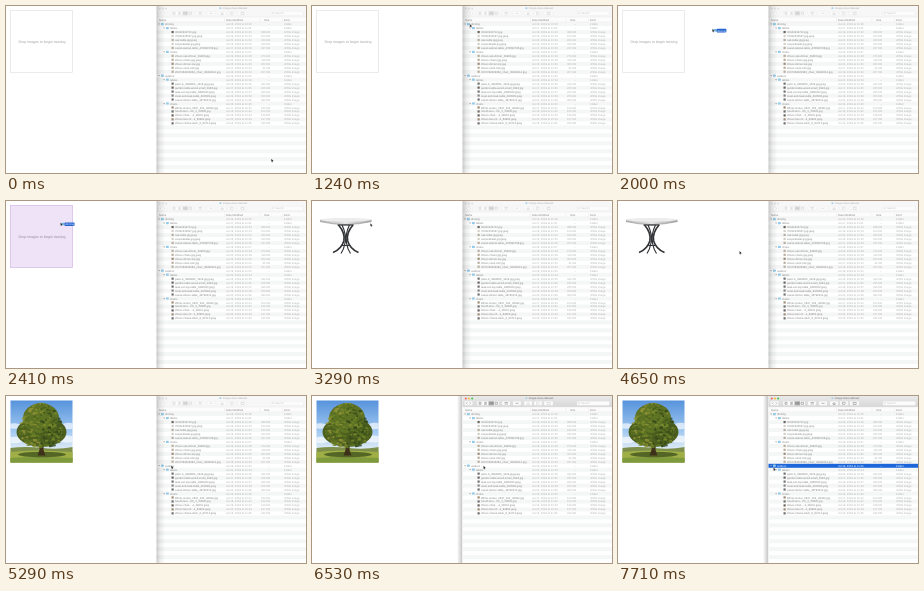
Recreate the animation shown at these times as an HTML page. Size 300 by 167 pixels, loop 8 s.

```html
<!DOCTYPE html>
<html lang="en">
<head>
<meta charset="utf-8">
<title>Drop images to train</title>
<style>
html, body { margin: 0; width: 100%; height: 100%; overflow: hidden; background: #fff; }
svg { display: block; width: 100vw; height: 100vh; }
text { font-family: "Liberation Sans", Arial, sans-serif; font-size: 2.75px; fill: #858585; text-rendering: geometricPrecision; }
</style>
</head>
<body>
<svg id="stage" viewBox="0 0 300 167" preserveAspectRatio="none">
  <defs>
    <linearGradient id="sky" x2="0" y2="1">
      <stop offset="0" stop-color="#5592dc"/><stop offset=".5" stop-color="#a3c9f0"/><stop offset=".82" stop-color="#e6eff6"/>
    </linearGradient>
    <linearGradient id="shade"><stop offset="0" stop-color="#000" stop-opacity="0"/><stop offset="1" stop-color="#000" stop-opacity=".24"/></linearGradient>
    <linearGradient id="cover"><stop offset="0" stop-color="#000" stop-opacity=".2"/><stop offset=".4" stop-color="#000" stop-opacity=".07"/><stop offset="1" stop-color="#000" stop-opacity="0"/></linearGradient>
    <linearGradient id="bar" x2="0" y2="1"><stop offset="0" stop-color="#e9e9e9"/><stop offset="1" stop-color="#d8d8d8"/></linearGradient>
    <linearGradient id="marble"><stop offset="0" stop-color="#b4b4b4"/><stop offset=".5" stop-color="#e6e6e6"/><stop offset="1" stop-color="#a4a4a4"/></linearGradient>
    <clipPath id="frame"><rect x="4.5" y="4.5" width="62" height="62"/></clipPath>
  </defs>
</svg>
<script>
const LOOP = 8000, ROW = 3.97, TOP = 16.2;
const stage = document.getElementById('stage');

function add(parent, tag, attrs = {}, text) {
  const node = document.createElementNS('http://www.w3.org/2000/svg', tag);
  for (const key in attrs) node.setAttribute(key, attrs[key]);
  if (text) node.textContent = text;
  parent.appendChild(node);
  return node;
}
const group = (parent = stage, attrs) => add(parent, 'g', attrs);
const box = (p, x, y, width, height, fill, more) => add(p, 'rect', { x, y, width, height, fill, ...more });
const path = (p, d, fill, more) => add(p, 'path', { d, fill, ...more });
const line = (p, d, stroke, width = 1) => path(p, d, 'none', { stroke, 'stroke-width': width, 'stroke-linejoin': 'round' });
const label = (p, x, y, str, more) => add(p, 'text', { x, y, ...more }, str);
const oval = (p, cx, cy, rx, ry, fill, more) => add(p, 'ellipse', { cx, cy, rx, ry, fill, ...more });

function seeded(seed) {
  return () => (seed = (seed * 16807) % 2147483647) / 2147483647;
}

// Drop area
box(stage, 0, 0, 300, 167, '#fff');
const zone = group();
const zoneBox = box(zone, 4.5, 4.5, 62, 62, '#fff', { 'stroke-width': .7 });
const zoneText = label(zone, 36, 37, 'Drop images to begin training', { 'text-anchor': 'middle', style: 'font-size:3.6px' });

function roundTable(top, leg, dy) {
  const g = group(stage, { transform: `translate(0 ${dy})` });
  path(g, 'M8 18.8V20.6Q33.5 26.4 59.5 20.6V18.8Z', top);
  oval(g, 33.7, 18.8, 25.8, 1.9, '#ececec');
  line(g, 'M8 20.6Q33.5 26.4 59.5 20.6', '#777', .5);
  box(g, 25.5, 23.4, 16, 1.2, leg);
  line(g, 'M26.5 24Q33.5 32 31.8 40Q29.5 48 21 51.5M41 24Q34 32 35.7 40Q38 48 46.5 51.5', leg, 1.6);
  line(g, 'M30 24Q34.5 33 33 42Q32 48 29 52.5M37.5 24Q33 33 34.5 42Q35.5 48 38.5 52.5', leg, 1.2);
  line(g, 'M30 44.5H37.5', leg, 1);
  return g;
}

function diningRoom() {
  const g = group(stage, { 'clip-path': 'url(#frame)' });
  box(g, 4, 4, 63, 63, '#d3cfc8');
  box(g, 4, 4, 24, 14, '#bdb5a8');
  box(g, 7, 4, 4, 14, '#e4dfd5');
  box(g, 19, 4, 4, 14, '#ddd7cd');
  box(g, 40, 4, 27, 18, '#c7c4be');
  path(g, 'M4 34L67 27V67H4Z', '#c6c1b8');
  path(g, 'M4 51L42 35L67 42V67H4Z', '#d8d4cd');
  for (const x of [9, 20, 32, 43]) {
    box(g, x, 10, 7, 9, '#5b5751', { rx: 1 });
    line(g, `M${x + 1} 19V29M${x + 6} 19V29`, '#514c46', .8);
  }
  path(g, 'M4 20L46 14.5L58 17L6 24.5Z', '#bd8e5d');
  path(g, 'M6 24.5L58 17V18.8L6 26.5Z', '#87592f');
  line(g, 'M10 26L15 41L20 25M44 21L50 40L54 19', '#35302b', 1.4);
  path(g, 'M53 16Q59 13 65 17L64 32H54Z', '#514d48');
  path(g, 'M47 31L55 28L66 32L55 36.5Z', '#6b665f');
  line(g, 'M48 32V46M55 36V53M65 33V48', '#35322e', 1);
  path(g, 'M4 34L30 29.5L40 32L4 39Z', '#b07f50');
  path(g, 'M4 39L40 32V33.8L4 41Z', '#7b5230');
  line(g, 'M7 41L10 55L15 39M31 36L34 47L38 34', '#3b342e', 1.2);
  return g;
}

function treePhoto() {
  const g = group(stage, { 'clip-path': 'url(#frame)' });
  const rnd = seeded(41);
  box(g, 4, 4, 63, 63, 'url(#sky)');
  for (const [x, y, r] of [[8, 30, 7], [63, 30, 8], [61, 43, 9], [9, 44, 8]]) {
    oval(g, x, y, r, r / 2.5, '#fff', { opacity: .65 });
  }
  path(g, 'M4 52Q20 50 36 52T67 51V67H4Z', '#7d8f4a');
  path(g, 'M4 56Q30 53 67 56V67H4Z', '#9fae45');
  path(g, 'M4 62Q30 60 67 62V67H4Z', '#7e9a3c');
  oval(g, 36, 58.5, 24, 2.8, '#475a22', { opacity: .85 });
  path(g, 'M33.5 44H38L37.5 54L39.5 59.5H31.5L33.5 54Z', '#3f301a');
  oval(g, 35.5, 36, 25, 15, '#4c5f1f');
  oval(g, 35, 22, 18, 15, '#5e7225');
  const leaves = ['#34481a', '#465c1c', '#5f7622', '#7b8b2c', '#96973a', '#50681f'];
  for (let i = 0; i < 330; i++) {
    const a = rnd() * Math.PI * 2, r = Math.sqrt(rnd());
    const wide = 21 + 6 * Math.sin(a);
    const x = 35.5 + Math.cos(a) * r * wide, y = 29.5 + Math.sin(a) * r * 23;
    const tone = Math.floor(rnd() * 4 + (x < 35 ? 2 : 0));
    oval(g, x, y, .7 + rnd() * 1.4, .6 + rnd() * .8, leaves[tone], { opacity: .8 });
  }
  return g;
}

const pictures = {
  table: roundTable('url(#marble)', '#303235', 0),
  wood: roundTable('#9a6b42', '#5c3d26', 4),
  room: diningRoom(),
  tree: treePhoto()
};

// File window
const shadow = box(stage, 145, 0, 5.5, 167, 'url(#shade)');
const list = group();
box(list, 150.5, 0, 149.5, 167, '#fff');
for (let i = 0; TOP + i * ROW < 167; i += 2) box(list, 150.5, TOP + i * ROW, 149.5, ROW, '#f5f6f6');
const picked = box(list, 150.5, TOP + 13 * ROW, 149.5, ROW, '#1c66d9');

const names = [
  ['dinning', 0], ['tables', 1],
  '30343432712.jpg', '70332432547.jpg.jpeg', 'oak-table.jpg.jpeg', 'set-pedestal.jpg.jpeg', 'sweet-walnut-table_478090708.jpg',
  ['chairs', 1],
  '20sec-oak-dinner_39486.jpg', '20sec-chairs.jpg.jpeg', '20sec-dinner-top.jpg', '20sec-stool-412.jpg', '2047384029384_chair_38490214.jpg',
  ['outdoor', 0], ['tables', 1],
  'patio-b_3984856_3429.jpg.jpeg', 'garden-table-wood-small_3948.jpg', 'teak-set-top-table_9385020.jpeg', 'steel-and-teak-table_490583.jpeg', 'sweet-dinner-table_48790213.jpg',
  ['chairs', 1],
  'White-rocker_3847_304_48392.jpg', 'South-Gre...rch_3_20800.jpg', '20sec-chair-...4_38201.jpeg', '20sec-two-ch...4_84902.jpeg', '20sec-chaise-deck_8_84710.jpeg'
];
const rnd = seeded(7);
const thumbs = ['#6b655f', '#d2cec8', '#a08a74', '#858585', '#b9ad9d', '#707070'];
let pickedRow;
names.forEach((entry, i) => {
  const folder = Array.isArray(entry);
  const [name, depth] = folder ? entry : [entry, 2];
  const y = TOP + i * ROW, x = 155 + depth * 5, base = y + 2.95;
  const g = group(list);
  if (folder) {
    path(g, `M${x - 2.8} ${y + 1.3}h1.8l-.9 1.5z`, '#a5a5a5');
    box(g, x, y + .8, 2.8, 2.2, '#93cbea', { rx: .3 });
  } else {
    box(g, x + .5, y + .8, 2.2, 2.2, thumbs[Math.floor(rnd() * 6)]);
  }
  label(g, x + 4, base, name);
  const dim = { style: 'fill:#b0b0b0' };
  label(g, 220, base, `Jul ${16 + i % 5}, 2018 at ${10 + i % 3}:${20 + i}`, dim);
  label(g, 264, base, folder ? '--' : `${Math.floor(20 + rnd() * 400)} KB`, { 'text-anchor': 'end', ...dim });
  label(g, 278, base, folder ? 'Folder' : 'JPEG image', dim);
  if (i === 13) pickedRow = [...g.querySelectorAll('text')].map(node => [node, node.style.fill]);
});

const chrome = group();
const bar = box(chrome, 150.5, 0, 149.5, 11);
box(chrome, 150.5, 11, 149.5, 5.2, '#fcfcfc');
line(chrome, 'M150.5 11H300M150.5 16H300', '#e0e0e0', .4);
line(chrome, 'M218.5 12V16M254 12V16M276.5 12V16', '#e6e6e6', .4);
[['Name', 153], ['Date Modified', 220], ['Size', 258], ['Kind', 278]].forEach(([s, x]) => label(chrome, x, 14.8, s));
const title = label(chrome, 229, 3.4, 'image-class-dataset', { 'text-anchor': 'middle' });
box(chrome, 213.5, 1.3, 1.8, 1.7, '#a5cfe8');
const lights = ['#f25f57', '#f5bd2e', '#36c64b'].map((color, i) => [add(chrome, 'circle', { cx: 153.8 + i * 3.2, cy: 2.4, r: 1 }), color]);

const buttons = group(chrome, { stroke: '#dcdcdc', 'stroke-width': .25 });
for (const [x, w] of [[152.5, 8], [165, 22], [190, 8], [201, 8], [212, 8], [222, 8], [232, 9], [265, 32.5]]) {
  box(buttons, x, 5.3, w, 4, '#fcfcfc', { rx: .7 });
}
const icons = group(chrome, { 'stroke-width': .6 });
path(icons, 'M155.3 6.3L154.3 7.3L155.3 8.3M157.7 6.3L158.7 7.3L157.7 8.3', 'none');
path(icons, 'M167 6.3h2v2h-2zM172.2 6.3h2.6M172.2 7.3h2.6M172.2 8.3h2.6M178 6.3v2M179.3 6.3v2M180.6 6.3v2M183 6.3h2.5v2h-2.5zM192.5 6.5h3.5M192.5 8h3.5M203.4 7.3h3.2', 'none');
const listMode = box(chrome, 176.5, 5.3, 5.5, 4, '#777');
const actions = group(chrome, { 'stroke-width': .6 });
path(actions, 'M215 6.9v1.7h2.2V6.9M216.1 7.8V6M224.4 6.3h2.6l1 1-1 1h-2.6zM235 6.4h3.2v2H235z', 'none');
label(chrome, 269, 8.3, 'Search', { style: 'fill:#c4c4c4' });
add(chrome, 'circle', { cx: 267, cy: 7.1, r: .7, fill: 'none', stroke: '#bbb', 'stroke-width': .3 });
const cover = box(stage, 150.5, 0, 9, 167, 'url(#cover)');

// Pointer with the dragged folder
const pointer = group();
const badge = group(pointer);
box(badge, 1.2, .3, 2.7, 2.5, '#6fb6e4', { rx: .3 });
box(badge, 4, 0, 10, 3.6, '#2565cf', { rx: .8 });
label(badge, 5, 2.75, 'dinning', { style: 'fill:#fff;font-size:2.6px' });
path(pointer, 'M0 0V3.2L.75 2.5L1.2 3.6L1.8 3.3L1.35 2.3H2.3Z', '#333', { stroke: '#fff', 'stroke-width': .35, 'paint-order': 'stroke' });

// start, end, steps, target x, target y
const moves = [
  [0, 0, 1, 265.3, 152.7],
  [60, 120, 2, 154.7, 36.5],
  [410, 710, 6, 157.7, 23.3],
  [940, 1240, 6, 157.8, 18],
  [1410, 1470, 2, 157.3, 18],
  [1760, 2180, 8, 65.3, 25],
  [2350, 2410, 2, 54.5, 21.5],
  [2470, 2470, 1, 53.8, 21.3],
  [3290, 3530, 5, 97.8, 29.5],
  [4000, 4410, 7, 113.3, 41],
  [4590, 4650, 2, 121.5, 50],
  [4710, 5290, 10, 165.3, 69.5],
  [6350, 6530, 4, 171.5, 69.8],
  [7350, 7710, 7, 155.5, 71.5]
];
const shows = [[0, 'zone'], [2820, 'table'], [3410, 'wood'], [3710, 'room'], [4000, 'wood'], [4410, 'table'], [4940, 'tree']];

function pointerAt(t) {
  let x = 0, y = 0;
  for (const [start, end, steps, tx, ty] of moves) {
    if (t < start) break;
    const gap = steps > 1 ? (end - start) / (steps - 1) : 1;
    const p = Math.min(1, (Math.floor((t - start) / gap + 1e-6) + 1) / steps);
    const ease = p * p * (3 - 2 * p);
    x += (tx - x) * ease;
    y += (ty - y) * ease;
  }
  return [x, y];
}

const show = (node, on) => node.setAttribute('visibility', on ? 'visible' : 'hidden');

function draw(t) {
  const scene = shows.filter(([at]) => t >= at).pop()[1];
  show(zone, scene === 'zone');
  for (const key in pictures) show(pictures[key], key === scene);

  const hover = t >= 2350 && t < 2710;
  zoneBox.setAttribute('fill', hover ? '#efe3f8' : '#fff');
  zoneBox.setAttribute('stroke', hover ? '#d3b8e6' : '#e3e3e3');
  zoneText.style.fill = hover ? '#938a9b' : '#a2a2a2';

  // The front window casts its shadow over the other one
  const active = t >= 6350, chosen = t >= 6760, enabled = t >= 6940;
  show(shadow, active);
  show(cover, !active);
  bar.setAttribute('fill', active ? 'url(#bar)' : '#f7f7f7');
  title.style.fill = active ? '#707070' : '#b0b0b0';
  icons.setAttribute('stroke', active ? '#888' : '#cfcfcf');
  actions.setAttribute('stroke', enabled ? '#888' : '#d2d2d2');
  listMode.setAttribute('opacity', active ? .6 : .2);
  for (const [dot, color] of lights) dot.setAttribute('fill', active ? color : '#dedede');
  show(picked, chosen);
  for (const [node, color] of pickedRow) node.style.fill = chosen ? '#fff' : color;

  show(badge, t >= 1760 && t < 2710);
  pointer.setAttribute('transform', `translate(${pointerAt(t)})`);
}

const began = performance.now();
function tick() {
  draw((performance.now() - began) % LOOP);
  requestAnimationFrame(tick);
}
draw(0);
requestAnimationFrame(tick);
</script>
</body>
</html>
```
